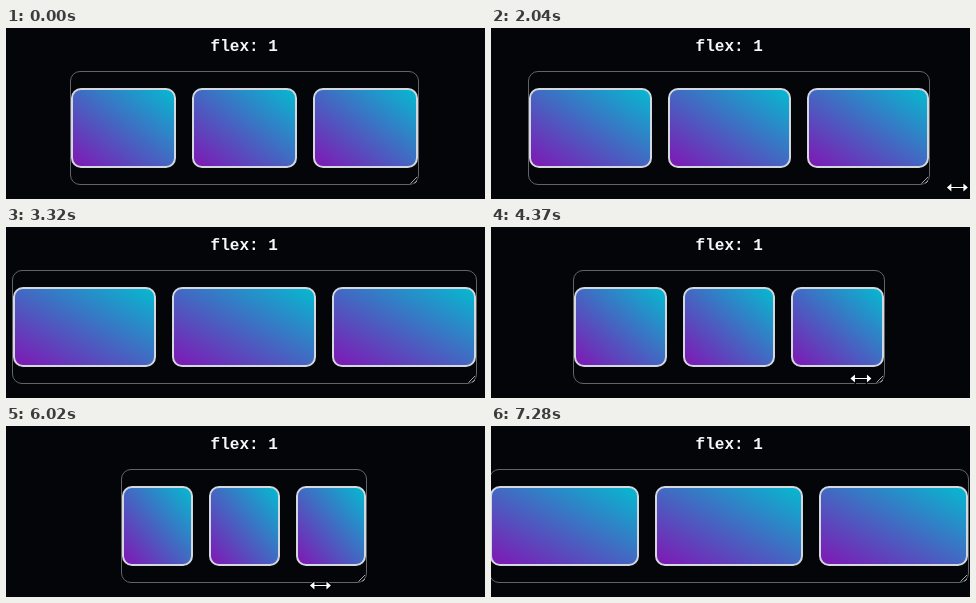
An HTML page with a canvas that plays this animation: 479 by 171 pixels, repeating every 8.27 s.

```html
<!DOCTYPE html>
<html lang="en">
<head>
<meta charset="utf-8">
<title>flex: 1</title>
<style>
  html, body { margin: 0; width: 100%; height: 100%; overflow: hidden; background: #040509; }
  canvas { position: absolute; left: 0; top: 0; width: 479px; height: 171px; }
  h1 {
    position: absolute; left: 0; top: 8px; width: 476.4px; margin: 0;
    font: 700 16px/22px "Liberation Mono", "DejaVu Sans Mono", monospace;
    text-align: center; color: #f6f7f9;
  }
</style>
</head>
<body>
<canvas id="stage" width="479" height="171"></canvas>
<h1>flex: 1</h1>
<script>
const ctx = document.getElementById('stage').getContext('2d');
const LOOP = 8270, SPAN = 476.4, GAP = 16, CARDS = 3, RADIUS = 10;
const REST = 63.8, FULL = -1.55, NARROW = 149;
const LEAD = 28; // the box trails the pointer by this many ms

// Start of each movement and the length of its steps, in ms
const RUNS = [[600, 73.3], [1420, 69.1], [3180, 70], [5740, 70]];

// Left edge of the box: widen, narrow, widen again
const EDGE = [
  [1350, REST], [2040, 37.3], [2940, FULL],
  [3150, FULL], [3320, 5.8], [4370, 82.3], [5000, 125.8], [5560, NARROW],
  [5670, NARROW], [6020, 115.3], [6510, 57.2], [7280, FULL]
];

// Height of the pointer, which wanders while dragging
const HEIGHT = [
  [600, 167], [820, 155], [1420, 155.5], [2040, 159.5],
  [4370, 151.5], [5000, 160], [5740, 162], [6020, 159.5]
];

function track(keys, t) {
  const n = keys.findIndex(k => k[0] > t);
  if (n === 0) return keys[0][1];
  if (n < 0) return keys[keys.length - 1][1];
  const [t0, a] = keys[n - 1], [t1, b] = keys[n];
  return a + (b - a) * (t - t0) / (t1 - t0);
}

function stepped(t) {
  const run = RUNS.filter(r => r[0] <= t).pop();
  if (!run) return 0;
  const [start, step] = run;
  return start + Math.floor((t - start + 3) / step) * step;
}

function roundBox(x, y, w, h, r) {
  ctx.beginPath();
  ctx.roundRect(x, y, w, h, r);
}

function card(x, y, w, h) {
  // Gradient line square to the other diagonal, as in "to top right"
  const iw = w - 4, ih = h - 4, k = iw * ih / (iw * iw + ih * ih);
  const cx = x + w / 2, cy = y + h / 2, dx = ih * k, dy = iw * k;
  const g = ctx.createLinearGradient(cx - dx, cy + dy, cx + dx, cy - dy);
  g.addColorStop(0, '#8017b4');
  g.addColorStop(1, '#06b9d0');
  roundBox(x + 1, y + 1, w - 2, h - 2, RADIUS - 1);
  ctx.fillStyle = g;
  ctx.fill();
  ctx.strokeStyle = '#d3d7de';
  ctx.lineWidth = 2;
  ctx.stroke();
}

function grip(right) {
  ctx.strokeStyle = '#a3a5a9';
  ctx.beginPath();
  for (const size of [6.5, 2.5]) {
    ctx.moveTo(right - 2 - size, 155.5);
    ctx.lineTo(right - 2, 155.5 - size);
  }
  ctx.stroke();
}

function container(left) {
  const l = Math.round(left), r = Math.round(SPAN - left);
  ctx.lineWidth = 1;
  ctx.strokeStyle = '#626469';
  roundBox(l + 0.5, 43.5, r - l - 1, 113, RADIUS - 0.5);
  ctx.stroke();
  grip(r);

  const w = (SPAN - 2 * left - 2 - GAP * (CARDS - 1)) / CARDS;
  for (let i = 0; i < CARDS; i++) {
    const x = left + 1 + i * (w + GAP), a = Math.round(x);
    card(a, 60, Math.round(x + w) - a, 80);
  }
}

function pointer(x, y) {
  ctx.beginPath();
  ctx.rect(x - 6, y - 0.6, 12, 1.2);
  for (const side of [-1, 1]) {
    ctx.moveTo(x + side * 10.5, y);
    ctx.lineTo(x + side * 6, y - 4);
    ctx.lineTo(x + side * 6, y + 4);
    ctx.closePath();
  }
  ctx.strokeStyle = '#000';
  ctx.lineWidth = 2;
  ctx.stroke();
  ctx.fillStyle = '#fff';
  ctx.fill();
}

function draw(now) {
  const t = stepped(now % LOOP);
  ctx.fillStyle = '#040509';
  ctx.fillRect(0, 0, 479, 171);
  container(track(EDGE, t));
  // A centred box grows by half the drag on each side
  const pull = REST - track(EDGE, t + LEAD);
  if (t >= 600) pointer(410.8 + 2 * pull, track(HEIGHT, t));
}

const begin = performance.now();
function frame() {
  draw(performance.now() - begin);
  requestAnimationFrame(frame);
}
frame();
</script>
</body>
</html>
```
